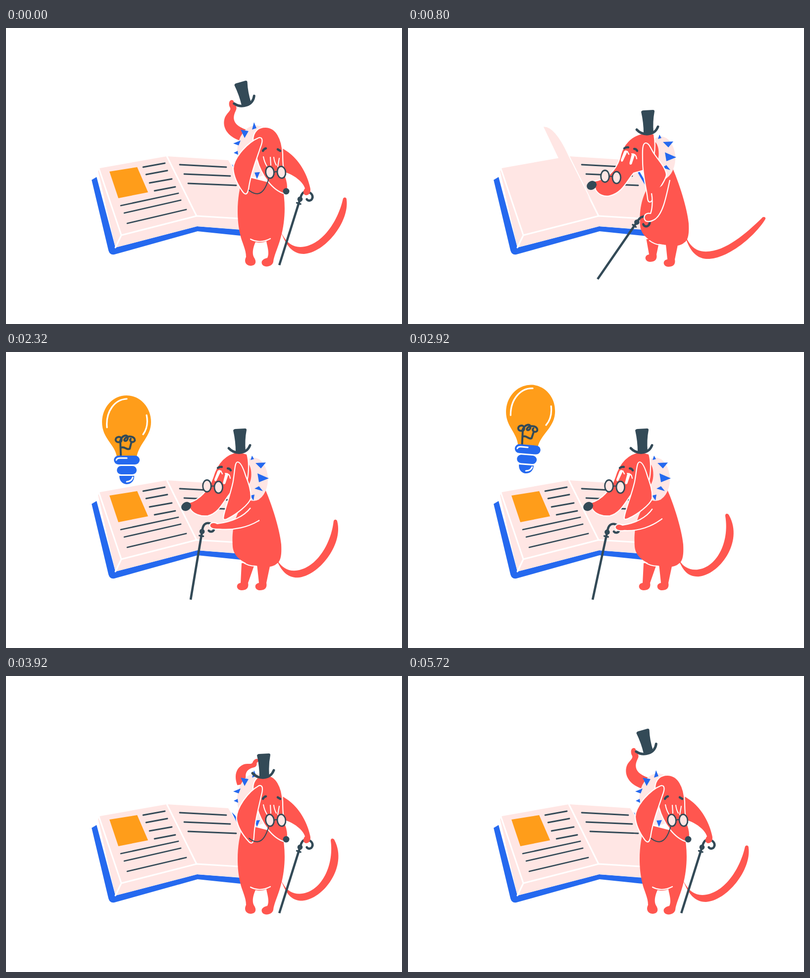
An HTML page for the animation above (5760 ms loop, 800 by 600 pixels).

```html
<!DOCTYPE html>
<html lang="en">
<head>
<meta charset="utf-8">
<title>Reading dog</title>
<style>
  html, body { margin: 0; width: 100%; height: 100%; overflow: hidden; background: #fff; }
  svg { display: block; width: 100vw; height: 100vh; }
  .red { fill: #ff564f; }
  .pink { fill: #ffe6e4; }
  .blue { fill: #2569ef; }
  .orange { fill: #ff9d1a; }
  .navy { fill: #334a57; }
  .ink, .edge { fill: none; stroke: #334a57; stroke-width: 2.8; stroke-linecap: round; }
  .edge { stroke: #fff; stroke-width: 2.2; stroke-linejoin: round; }
  .rim { stroke: #fff; stroke-width: 2.2; stroke-linejoin: round; }
  .lens { fill: #ffe6e4; stroke: #334a57; stroke-width: 2.8; }
</style>
</head>
<body>
<svg viewBox="0 0 800 600">
  <defs>
    <g id="hat">
      <path class="navy" d="M-13 -44 Q-12 -47 -8 -47 L11 -48 Q14 -48 14 -45 Q10 -24 12 -2 L-8 0 Q-8 -22 -13 -44Z"/>
      <path class="ink" style="stroke-width:5" d="M-22 -8 C-10 5 14 5 21 -14"/>
    </g>
    <g id="cane">
      <path class="ink" style="stroke-width:4.6;stroke-linecap:butt" d="M0 0 V140"/>
      <circle class="navy" r="5.3"/>
      <path class="ink" style="stroke-width:3.4" d="M-4 9 H4"/>
      <path class="ink" style="stroke-width:4.6" d="M0 -5 C0 -14 4 -19 11 -19 C20 -19 24 -13 23 -8 C22 -3 17 -1 13 -4"/>
    </g>
    <g id="specs">
      <ellipse class="lens" rx="8.4" ry="12"/>
      <ellipse class="lens" cx="23.3" cy="2.6" rx="8.4" ry="12"/>
      <path class="ink" style="stroke-width:2.2" d="M9 1 Q12 -1 15 1"/>
    </g>
  </defs>

  <g id="book">
    <path class="blue" d="M173 308 L183 302 L221 445 L386 402 L525 413 L532 427 L387 412 L219 459 Q210 461 207 451Z"/>
    <path class="blue" d="M456 276 L463 283 L483 317 L477 319Z"/>
    <path class="pink" d="M190 284 L325 260 L449 268 L520 388 L525 412 L386 402 L221 445 L186 290Z"/>
    <path class="edge" style="stroke-width:3" d="M188 286 L233 420 L385 381 L520 389 M233 420 L221 445"/>
    <path class="edge" style="stroke-width:3" d="M325 260 L385 381"/>
    <path class="ink" d="M351 277 L445 282 M360 296 L453 300 M368 315 L465 319"/>
    <path id="sheet" class="pink"/>
    <g id="text">
      <path class="orange" d="M209 291 L265 282 L287 333 L227 345Z"/>
      <path class="ink" d="M277 282 L321 274 M283 297 L326 289 M290 314 L335 306 M300 330 L342 322 M232 360 L348 335 M239 375 L353 349 M245 396 L364 368"/>
    </g>
    <path id="cover" class="pink"/>
  </g>

  <g id="bulb">
    <path class="orange" d="M-20 -55 C-24 -82 -50 -92 -50 -126 A49.5 54 0 0 1 49 -126 C49 -96 24 -82 20 -55Z"/>
    <path class="edge" style="stroke-width:3.2" d="M-40 -115 C-43 -148 -24 -172 0 -173 M40 -140 C43 -125 41 -112 33 -101"/>
    <path class="ink" style="stroke-width:4" d="M-12 -57 L-13 -86 C-24 -82 -26 -95 -16 -96 C-8 -96 -10 -84 -14 -86 C-10 -100 2 -102 2 -94 C2 -86 -8 -86 -4 -92 C2 -100 18 -97 16 -88 C12 -82 4 -88 8 -92 M-12 -74 C-4 -78 0 -68 6 -72 L9 -84"/>
    <rect class="blue" x="-26" y="-58" width="52" height="18" rx="9"/>
    <rect class="blue" x="-20" y="-37" width="40" height="17" rx="8.5"/>
    <path class="blue" d="M-15 -17 H15 C15 -4 6 0 0 0 C-6 0 -15 -4 -15 -17Z"/>
    <path class="edge" style="stroke-width:3" d="M-21 -49 Q-20 -53 -14 -53 H0 M0 -5 Q10 -6 12 -14"/>
  </g>

  <path id="tail" class="red"/>

  <g id="front">
    <use href="#cane" transform="translate(594 347) rotate(17.4)"/>
    <path class="red" d="M556 243 C590 260 608 295 614 322 C617 332 613 339 606 339 C600 338 599 331 604 325 C600 312 582 297 560 291Z"/>
    <path id="wave" class="red" d="M472 228 C446 219 436 200 442 182 C446 172 455 168 453 162 C449 156 450 146 456 146 C460 146 461 150 460 154 C466 158 467 162 464 168 C455 186 462 198 485 206Z"/>
    <path class="red" d="M480 300 C466 335 465 385 473 418 C476 434 485 448 485 464 C480 474 485 482 495 482 C506 481 506 472 501 465 C496 456 500 443 504 434 C512 436 520 435 526 432 C527 440 533 455 528 466 C518 468 514 474 518 480 C523 486 538 484 540 474 C541 462 549 447 555 425 C565 390 565 350 558 320Z"/>
    <path class="edge" d="M494 428 Q513 438 534 427"/>
    <ellipse class="pink" cx="505" cy="250" rx="38" ry="52.5"/>
    <path class="blue" d="M474 206 L490 209 L482 223Z M497 206 L501 191 L506 203Z M459 234 L474 228 L470 238Z M460 253 L468 249 L469 257Z M502 293 L513 292 L507 306Z"/>
    <path class="red rim" d="M499 228 C499 210 510 201 524 201 C546 201 558 225 559 255 C559 275 560 290 567 308 C570 320 570 332 563 336 C540 330 515 300 506 262Z"/>
    <path class="edge" style="stroke-width:2" d="M520 261 Q522 272 527 280 M534 262 L535 278 M541 262 Q542 271 546 278 M552 264 L549 281"/>
    <path class="ink" style="stroke-width:4.6" d="M519 249 Q521 245 525 244 M549 246 L554 249"/>
    <circle class="navy" cx="566" cy="331" r="6.5"/>
    <path id="ear1" class="red rim" d="M512 222 C520 222 518 232 514 242 C505 270 496 290 491 320 C489 336 485 340 479 333 C468 318 460 303 459 285 C460 262 490 230 512 222Z"/>
    <path class="ink" style="stroke-width:2" d="M531 304 C524 330 512 346 491 329"/>
    <use href="#specs" transform="translate(533 292.5) rotate(-6.4)"/>
    <use id="hat1" href="#hat"/>
  </g>

  <g id="side">
    <path id="legs" class="red"/>
    <g id="trunk">
      <path class="red" d="M485 300 C465 325 455 355 458 395 C460 415 480 432 512 434 C526 437 540 436 547 429 C556 424 557 408 556 390 C553 360 538 310 520 270Z"/>
      <path class="edge" d="M477 425 Q488 434 505 434"/>
      <ellipse class="pink" cx="500" cy="258" rx="29" ry="44"/>
      <path class="blue" d="M504 225 L525 224 L515 236Z M508 246 L531 256 L511 264Z M502 277 L511 272 L519 282Z M494 219 L497 210 L501 217Z M493 291 L502 289 L500 301Z"/>
      <ellipse class="red" cx="485" cy="248" rx="10.5" ry="24"/>
    </g>
    <path id="head" class="red rim"/>
    <g id="face">
      <path fill="#fff" d="M427.500 241 Q433 236 433.500 243 L425 261 Q421 264 421 258Z M443 247 Q448.500 243 449 249 L443 267 Q438 270 438.500 264Z"/>
      <path class="edge" d="M434 241 L437 247 M443 246 Q452 246 453 256"/>
      <path class="ink" style="stroke-width:4.4" d="M428 235 Q432 232 436 233 M448 236 Q452 236 454 240"/>
    </g>
    <ellipse id="nose" class="navy" rx="10.5" ry="8.6"/>
    <path id="ear2" class="red rim"/>
    <use id="glasses" href="#specs"/>
    <use id="hat2" href="#hat"/>
    <use id="stick" href="#cane"/>
    <path id="arm" class="red rim"/>
  </g>
</svg>

<script>
const LOOP = 5760, STEP = 40, TURN = 320, BACK = 3920;
const el = {};
document.querySelectorAll('[id]').forEach(e => el[e.id] = e);
const set = (id, name, value) => el[id].setAttribute(name, value);
const show = (id, on) => { el[id].style.display = on ? '' : 'none'; };
const lerp = (a, b, k) => a + (b - a) * k;
const clamp = x => Math.max(0, Math.min(1, x));
const ease = x => x * x * (3 - 2 * x);
const span = (t, a, b) => ease(clamp((t - a) / (b - a)));

// Eased values through rows of [time, ...values].
function key(t, ...rows) {
  const i = rows.findIndex(r => r[0] > t);
  if (i === 0) return rows[0].slice(1);
  if (i < 0) return rows[rows.length - 1].slice(1);
  const a = rows[i - 1], b = rows[i], k = span(t, a[0], b[0]);
  return a.slice(1).map((v, j) => lerp(v, b[j + 1], k));
}

// Blend of two paths that share their commands.
const NUM = /-?\d+(\.\d+)?/g;
function mix(p, q, k) {
  const to = q.match(NUM);
  let i = 0;
  return p.replace(NUM, n => lerp(+n, +to[i++], k).toFixed(2));
}

const TAIL_IN = 'M556 415 C566 440 574 455 598 455 C640 452 690 385 658 330 C656 325 649 324 650 331 C661 385 635 440 592 441 C578 441 568 434 562 425Z';
const TAIL_OUT = 'M556 415 C566 440 582 461 606 461 C648 459 698 402 718 366 C721 361 714 359 711 364 C680 399 640 446 597 447 C582 447 570 437 562 425Z';
const HEAD_UP = 'M470 202 C440 207 425 230 418 254 C410 278 392 300 368 306 L372 318 C378 328 392 334 408 332 C432 326 440 300 458 280 L482 280 C491 255 492 225 487 207Z';
const HEAD_LOW = 'M482 213 C449 215 432 240 428 264 C420 288 404 306 375 311 L379 328 C385 338 396 343 408 340 C434 334 443 308 456 294 L488 285 C500 262 500 235 497 215Z';
const EAR_FWD = 'M468 223 C462 222 460 240 453 262 C442 292 428 315 424 330 C422 336 427 336 434 333 C450 328 478 312 484 300 C488 282 482 262 480 252 C478 240 474 224 468 223Z';
const EAR_HANG = 'M480 233 C472 234 474 255 474 270 C474 300 482 325 484 346 C485 354 490 355 494 348 C500 335 520 312 522 298 C522 285 506 268 498 256 C491 247 488 233 480 233Z';
const ARM_DOWN = 'M492 335 C495 352 493 368 490 376 C478 374 474 384 480 391 C486 394 494 391 500 387 C515 375 521 345 529 308';
const ARM_OUT = 'M494 316 C480 334 455 345 427 348 C418 343 410 347 412 354 C416 360 424 359 430 359 C460 362 490 355 512 341';

// Outer edge of a turning page, measured from the spine.
function pageEdge(k) {
  const a = k * Math.PI, c = Math.cos(a), lift = 85 * Math.sin(a);
  return { x: c * (c > 0 ? 124 : 135), base: lerp(8, 24, k), lift };
}
function pagePath({ x, base, lift }) {
  const y = base - lift, cy = base / 2 - lift * .9, m = 1.13;
  return `M325 261 Q${325 + x * .54} ${261 + cy} ${325 + x} ${261 + y}` +
    `L${385 + x * m} ${381 + y * m} Q${385 + x * m * .54} ${381 + cy * m} 385 381Z`;
}

function drawBook(t) {
  const first = t > 160 && t < 520, second = t >= 520 && t < 1000;
  show('cover', first);
  show('sheet', second);
  let matrix = '', visible = !second;
  if (first) set('cover', 'd', pagePath(pageEdge(span(t, 160, 520))));
  if (second) {
    const k = span(t, 520, 1000), e = pageEdge(k);
    set('sheet', 'd', pagePath(e));
    visible = k > .72;
    // Shear the printed side with its page, keeping the spine fixed.
    const dx = e.x + 135, dy = e.base - e.lift - 24, u = -.0068, v = .0034;
    const a = 1 + dx * u, b = dy * u, c = dx * v, d = 1 + dy * v;
    matrix = `translate(325 261) matrix(${a} ${b} ${c} ${d} 0 0) translate(-325 -261)`;
  }
  show('text', visible);
  set('text', 'transform', matrix);
}

function drawBulb(t) {
  show('bulb', t >= 1320 && t < 3600);
  const [x, y, turn, size] = key(t,
    [1300, 245, 311, -30, 0], [1560, 232, 280, -14, .75], [1800, 238, 266, 8, 1],
    [2060, 238, 224, -9, 1], [2320, 244, 268, 0, 1], [2640, 222, 218, -16, 1],
    [2860, 236, 240, 6, 1], [3060, 244, 268, 0, 1], [3440, 233, 298, -28, .37], [3600, 245, 311, -30, 0]);
  set('bulb', 'transform', `translate(${x} ${y}) rotate(${turn}) scale(${size})`);
}

function drawFront(t) {
  const [up] = key(t, [80, 1], [TURN, 0], [BACK, 0], [4180, 1], [4520, .97], [4780, 1]);
  const [ear] = key(t, [0, 0], [TURN, -4], [BACK, -6], [4520, -3], [5500, 0]);
  const down = 1 - up;
  set('wave', 'transform', `translate(475 218) rotate(${50 * down}) scale(${1 - .2 * down}) translate(-475 -218)`);
  set('hat1', 'transform', `translate(${lerp(520, 484, up)} ${lerp(205, 156, up)}) rotate(${-13 * up})`);
  set('ear1', 'transform', `rotate(${ear} 512 224)`);
}

// A leg from its hip's left corner down to a rounded foot.
function leg(x, y, hip, top) {
  return `M${hip} ${top} L${x - 4} ${y - 8} C${x - 15} ${y - 6} ${x - 13} ${y + 7} ${x - 2} ${y + 7}` +
    `C${x + 8} ${y + 7} ${x + 13} ${y + 2} ${x + 11} ${y - 8} L${hip + 27} ${top}Z`;
}

function drawSide(t, lean) {
  const dx = 11 * lean, dy = 6 * lean;
  const [lx, ly, rx, ry] = key(t, [800, 491, 467, 528, 477], [1120, 478, 476, 528, 477],
    [1320, 478, 476, 524, 472], [1520, 478, 476, 515, 476]);
  const [reach] = key(t, [900, 0], [1320, .56], [1640, 1], [2800, 1], [3400, 0]);
  const [hang] = key(t, [800, 1], [1200, 0]);
  const [gx, gy] = key(t, [800, -8, 29], [1320, 5, 2], [1600, 0, 0]);
  const [swing] = key(t, [1320, 0], [1800, -8], [2800, -8], [3300, 0]);

  set('trunk', 'transform', `translate(${dx} ${dy})`);
  set('legs', 'd', leg(lx, ly, 476 + dx / 2, 428) + leg(rx, ry, rx - 8, 430));
  set('head', 'd', mix(HEAD_UP, HEAD_LOW, lean));
  set('face', 'transform', `translate(${9 * lean} ${9 * lean})`);
  set('nose', 'transform', `translate(${364 + 7 * lean} ${313 + 6 * lean}) rotate(-32)`);
  set('ear2', 'd', mix(EAR_FWD, EAR_HANG, hang));
  set('ear2', 'transform', `translate(${dx * (1 - hang)} ${dy * (1 - hang)}) rotate(${swing} 468 223)`);
  set('glasses', 'transform', `translate(${406 + gx} ${271.5 + gy})`);
  set('hat2', 'transform', `translate(${472 + 12 * lean} ${203 + 11 * lean})`);

  // The cane swings about its tip once planted.
  const plant = clamp(reach / .5), angle = lerp(34.5, 9.5, reach), r = angle * Math.PI / 180;
  const x = lerp(383, 373, plant) + 140 * Math.sin(r);
  const y = lerp(509, 502, plant) - 140 * Math.cos(r);
  set('stick', 'transform', `translate(${x} ${y}) rotate(${angle})`);
  set('arm', 'd', mix(ARM_DOWN, ARM_OUT, reach));
}

function drawTail(t, shift) {
  const [wag] = t > TURN && t < BACK - 200
    ? (t < 460 ? key(t, [TURN, .62], [460, .74]) : [.5 + .5 * Math.cos((t - 880) * Math.PI / 420)])
    : key(t, [0, .5], [TURN, .62], [3720, .27], [BACK, .1], [4240, .5], [4560, .96],
      [4840, .6], [5060, .25], [5360, .58], [5720, .5]);
  set('tail', 'd', mix(TAIL_IN, TAIL_OUT, wag));
  const droop = 9 * span(t, TURN, 760) * (1 - span(t, 820, 1240));
  set('tail', 'transform', `translate(${shift} 0) rotate(${droop} 556 430)`);
}

function draw(t) {
  const side = t >= TURN && t < BACK;
  const [lean] = key(t, [800, 1], [1320, .33], [1640, 0]);
  show('front', !side);
  show('side', side);
  drawBook(t);
  drawBulb(t);
  drawTail(t, side ? lerp(-12, 0, lean) : 0);
  if (side) drawSide(t, lean); else drawFront(t);
}

const start = performance.now();
function frame() {
  const t = (performance.now() - start) % LOOP;
  draw(Math.floor(t / STEP) * STEP);
  requestAnimationFrame(frame);
}
frame();
</script>
</body>
</html>
```
